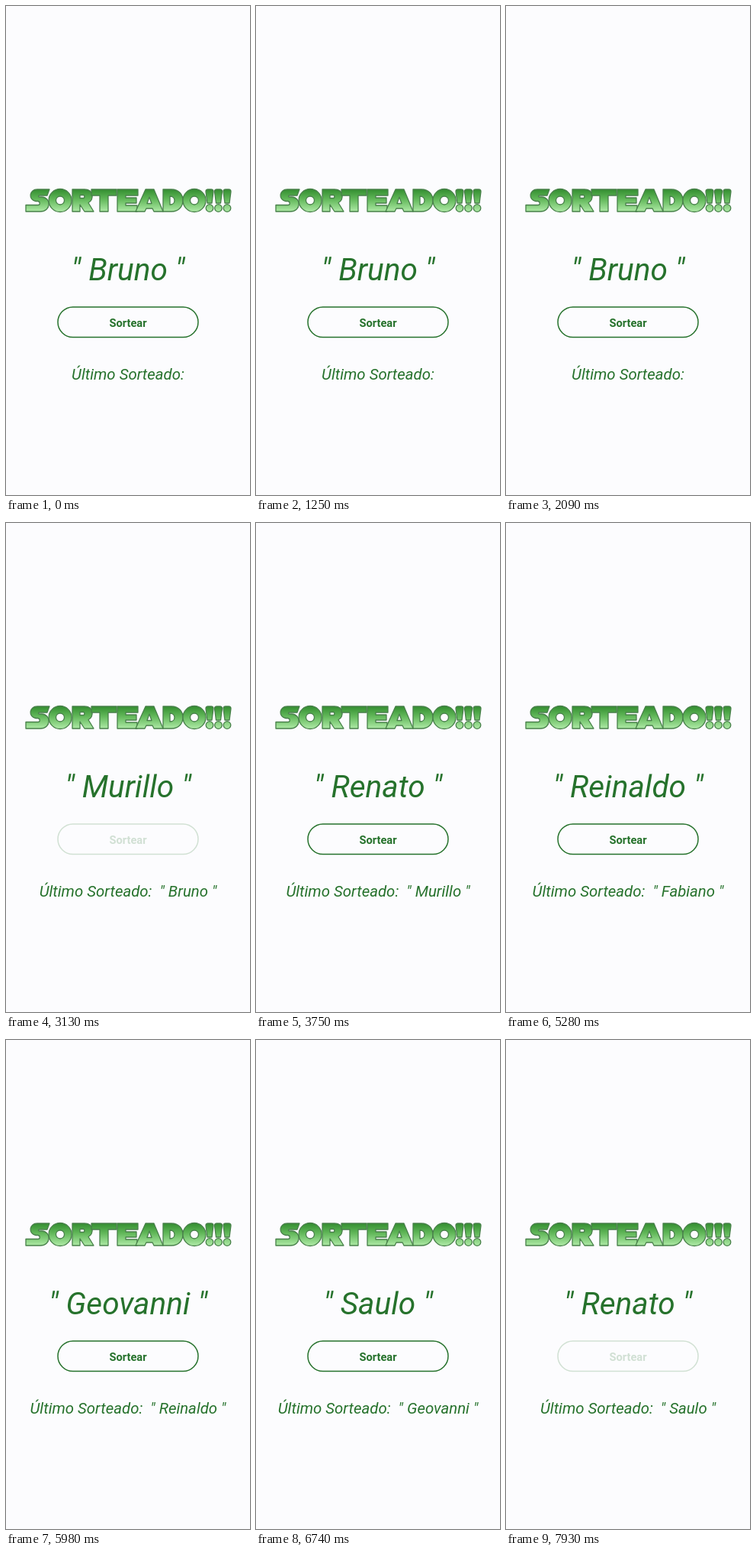
An HTML page with a canvas for the animation above (7.99 s loop, 320x640 px).

```html
<!DOCTYPE html>
<html lang="pt-BR">
<head>
<meta charset="utf-8">
<title>Sorteado</title>
<style>
html, body { margin: 0; width: 100%; height: 100%; overflow: hidden; background: #fcfcfe; }
canvas { display: block; width: 320px; height: 640px; }
</style>
</head>
<body>
<canvas id="stage"></canvas>
<script>
const W = 320, H = 640, LOOP = 7990;
const PAPER = '#fcfcfe', GREEN = '#26722c';
const NAMES = ['Bruno', 'Murillo', 'Renato', 'Fabiano', 'Reinaldo', 'Geovanni', 'Saulo', 'Renato'];

// Taps come at an even pace; each draws the next name on release.
const FIRST_RELEASE = 2390, TAP_EVERY = 800, HOLD = 220, FADE_OUT = 150, FADE_IN = 250;
const PRESSED_ALPHA = 0.2;

const canvas = document.getElementById('stage');
const ctx = canvas.getContext('2d');
const dpr = window.devicePixelRatio || 1;
canvas.width = W * dpr;
canvas.height = H * dpr;

const oval = (x, y, rx, ry) =>
  `M${x - rx} ${y}a${rx} ${ry} 0 1 1 ${2 * rx} 0a${rx} ${ry} 0 1 1 ${-2 * rx} 0Z`;
const ringO = x => oval(x, 254.5, 15, 15) + oval(x, 254.5, 5.5, 5.5);
const bang = x =>
  `M${x - 5} 243Q${x - 5} 240 ${x - 2} 240H${x + 2}Q${x + 5} 240 ${x + 5} 243L${x + 3} 258H${x - 3}Z` +
  oval(x, 264.5, 4.8, 4.8);

const TITLE = [
  'M57 240H41C30 240 29 254 39 255.5H42C45 256 45 260.5 42 260.5H26V269H45C59 269 60 251 47 250H44C42 250 42 248 44 248H54Z',
  ringO(71),
  'M87 240H103C115 240 116 254 108 257.5L115 269H103L97 260V269H87ZM97 247.5H102Q104 249.5 102 251.5H97Z',
  'M112 240H145V248H134V269H123V248H112Z',
  'M146 240H173V248H157V251H171V258H157V261H172V269H146Z',
  'M183 240H194L206 269H194L192 265H184L182 269H170ZM188 250L191 258.5H185Z',
  'M206 240H217C237 240 237 269 217 269H206ZM215 249V260C223 260 223 249 215 249Z',
  ringO(247),
  bang(267), bang(278.5), bang(290)
].map(d => new Path2D(d));

const titleFill = ctx.createLinearGradient(0, 239, 0, 270);
titleFill.addColorStop(0, '#2f8a2c');
titleFill.addColorStop(0.45, '#62b85a');
titleFill.addColorStop(1, '#b2ecaa');

const ease = u => u < 0.5 ? 2 * u * u : 1 - 2 * (1 - u) * (1 - u);
const clamp = u => Math.max(0, Math.min(1, u));

function drawTitle() {
  ctx.lineJoin = 'round';
  ctx.lineWidth = 1.3;
  ctx.strokeStyle = '#48804a';
  ctx.fillStyle = titleFill;
  for (const p of TITLE) {
    ctx.fill(p, 'evenodd');
    ctx.stroke(p);
  }
}

function drawText(text, y, font) {
  ctx.font = `${font} Roboto, sans-serif`;
  ctx.textAlign = 'center';
  ctx.fillStyle = GREEN;
  ctx.fillText(text, W / 2, y);
}

function drawButton(press) {
  ctx.globalAlpha = 1 - (1 - PRESSED_ALPHA) * press;
  ctx.beginPath();
  ctx.roundRect(68, 394, 184, 39.5, 19.75);
  ctx.strokeStyle = GREEN;
  ctx.lineWidth = 1.5;
  ctx.stroke();
  drawText('Sortear', 419.5, 'bold 14.7px');
  ctx.globalAlpha = 1;
}

// 0 at rest, 1 fully pressed.
function pressAt(t) {
  const since = t - FIRST_RELEASE + HOLD;
  if (since < 0) return 0;
  const local = since % TAP_EVERY;
  return local < HOLD
    ? ease(clamp(local / FADE_OUT))
    : 1 - ease(clamp((local - HOLD) / FADE_IN));
}

function draw(t) {
  const taps = Math.floor((t - FIRST_RELEASE) / TAP_EVERY) + 1;
  const index = Math.max(0, Math.min(NAMES.length - 1, taps));
  const last = index ? `  " ${NAMES[index - 1]} "` : '';
  ctx.setTransform(dpr, 0, 0, dpr, 0, 0);
  ctx.fillStyle = PAPER;
  ctx.fillRect(0, 0, W, H);
  drawTitle();
  drawText(`" ${NAMES[index]} "`, 358.5, 'italic 40.6px');
  drawButton(pressAt(t));
  drawText('Último Sorteado:' + last, 488.5, 'italic 20.4px');
}

const start = performance.now();
function tick() {
  draw((performance.now() - start) % LOOP);
  requestAnimationFrame(tick);
}
tick();
</script>
</body>
</html>
```
